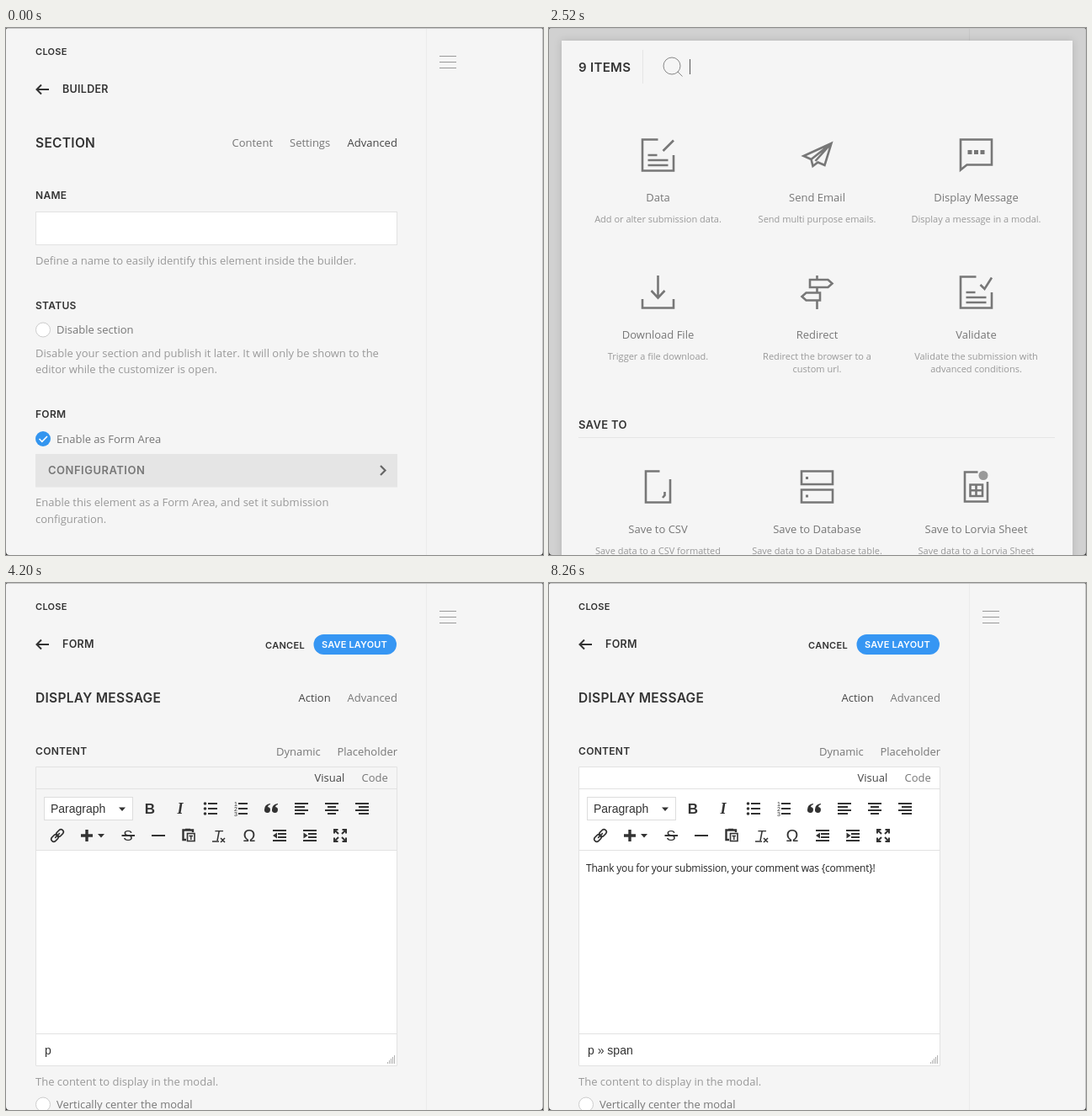
An HTML page for the animation above (8540 ms loop, 638 by 626 pixels).

```html
<!DOCTYPE html>
<html lang="en">
<head>
<meta charset="utf-8">
<title>Form action setup</title>
<style>
html, body { margin: 0; width: 100%; height: 100%; overflow: hidden; background: #f5f5f5; }
svg { display: block; width: 638px; height: 626px; }
text { font: 13px "Open Sans", sans-serif; fill: #777; white-space: pre; }
.cap { font-family: Inter, sans-serif; font-weight: 600; letter-spacing: .3px; fill: #333; }
.s11 { font-size: 11px; }
.s12 { font-size: 12px; }
.s125 { font-size: 12.5px; }
.s13 { font-size: 13px; }
.s15 { font-size: 15px; }
.title { font-size: 15.5px; }
.button { font-size: 13px; letter-spacing: .5px; fill: #777; }
.on { fill: #444; }
.help { fill: #999; }
.mid { text-anchor: middle; }
.card { color: #777; }
.card text { fill: currentColor; }
.card .note { font-size: 11px; fill: #999; }
.card.hover { color: #3d3d3d; }
.card.hover .note { fill: #777; }
.ui { font: 14px "Liberation Sans", Arial, sans-serif; fill: #333; }
.body { font-size: 12px; letter-spacing: -.2px; fill: #222; }
.tool { fill: none; stroke: #333; stroke-width: 2; }
.tool text { stroke: none; fill: #333; }
</style>
</head>
<body>
<svg id="stage" viewBox="0 0 638 626"></svg>
<script>
const LOOP = 8540, STEP = 70, PANEL = 499;

const text = (x, y, str, cls = '', id = '') =>
  `<text x="${x}" y="${y}" class="${cls}"${id && ` id="${id}"`}>${str}</text>`;
const rect = (x, y, w, h, fill, more = '') =>
  `<rect x="${x}" y="${y}" width="${w}" height="${h}" fill="${fill}" ${more}/>`;
const line = (d, color, width = 1, more = '') =>
  `<path d="${d}" fill="none" stroke="${color}" stroke-width="${width}" ${more}/>`;
const group = (id, body, more = '') => `<g id="${id}" ${more}>${body}</g>`;
const radio = y => `<circle cx="44" cy="${y}" r="8.5" fill="#fff" stroke="#ccc"/>`;

// Sidebar panels
const sectionPanel = group('section',
  text(35, 141.5, 'SECTION', 'cap title') +
  text(268.5, 140.5, 'Content') + text(337, 140.5, 'Settings') + text(405.5, 140.5, 'Advanced', 'on') +
  text(35, 203.3, 'NAME', 'cap s12') +
  rect(35.5, 218.5, 429, 39, '#fff', 'stroke="#e2e2e2"') +
  text(35, 280.5, 'Define a name to easily identify this element inside the builder.', 'help') +
  text(35, 333.5, 'STATUS', 'cap s12') + radio(358.5) + text(60, 363, 'Disable section') +
  text(35, 390.5, 'Disable your section and publish it later. It will only be shown to the', 'help') +
  text(35, 410, 'editor while the customizer is open.', 'help') +
  text(35, 463.3, 'FORM', 'cap s12') +
  '<circle cx="44" cy="488" r="9" fill="#3395ef"/>' + line('M39.5 488L42.8 491.3L49 485', '#fff', 1.6) +
  text(60, 492.5, 'Enable as Form Area') +
  rect(35, 506, 430, 39.5, '#e5e5e5') +
  text(50, 530.3, 'CONFIGURATION', 'cap button', 'config') +
  line('M445 520L450.5 525.5L445 531', '#666', 2.2) +
  text(35, 568, 'Enable this element as a Form Area, and set it submission', 'help') +
  text(35, 587.5, 'configuration.', 'help'));

const formTop =
  text(35, 141.5, 'FORM', 'cap title') +
  text(273, 140.5, 'Actions', 'on') + text(337, 140.5, 'Settings') + text(405.5, 140.5, 'Advanced') +
  text(35, 203.3, 'AFTER SUBMIT ACTIONS', 'cap s12');
const formHelp = y =>
  text(35, y, 'Set actions to be executed after a form has been successfully', 'help') +
  text(35, y + 19.5, 'submitted. The established order is respected when possible.', 'help');

const formPanel = group('form', formTop +
  text(35, 232.5, 'No actions yet.') +
  rect(35, 257, 147, 41, '#fff', 'rx="20.5"') +
  text(65, 282.3, 'ADD ACTION', 'cap button', 'add') + formHelp(332));

const listPanel = group('list', formTop +
  text(69, 248.5, 'Display Message', '', 'item') +
  line('M35 270.5H465', '#e2e2e2') +
  rect(35, 279, 93, 23.5, '#fff', 'rx="11.7"') +
  text(45, 295, 'ADD ACTION', 'cap s11') + formHelp(325.5));

// Editor toolbar
const bars = (x, y, spans) =>
  spans.map(([a, b], i) => `M${x + a} ${y - 6 + i * 4}H${x + b}`).join('');
const full = [-8, 8], half = [-2, 8];
const listRows = x => [-6, 0, 6].map(d => `M${x - 3} ${268 + d}H${x + 8}`).join('');
const corner = (x, y) =>
  `M${397 + x * 2} ${300 + y * 2}L${397 + x * 7} ${300 + y * 7}M${397 + x * 2.5} ${300 + y * 7}H${397 + x * 7}V${300 + y * 2.5}`;
const toolText = (x, y, str, style) => `<text x="${x}" y="${y}" class="mid" style="${style}">${str}</text>`;
const sans = 'font:bold 17px Liberation Sans,Arial,sans-serif';

const toolbar = '<g class="tool">' +
  rect(45.5, 254.5, 105, 27, '#fff', 'style="stroke:#ddd;stroke-width:1"') +
  text(53, 273, 'Paragraph', 'ui') +
  '<path d="M134 266.5h8l-4 4.5zM109 298h8l-4 4.5z" fill="#333" stroke="none"/>' +
  toolText(171, 274, 'B', sans) +
  toolText(207, 274, 'I', 'font:italic bold 18px Liberation Serif,serif') +
  `<path d="${listRows(243)}${listRows(279)}"/>` +
  [262, 268, 274].map((y, i) =>
    `<circle cx="236.500" cy="${y}" r="1.800" fill="#333" stroke="none"/>` +
    toolText(273, y + 2.5, i + 1, 'font:7px Liberation Sans,Arial,sans-serif')).join('') +
  '<path d="M314 262q-7 1-7 7a3.500 3.500 0 1 0 4-3q0-2 3-3zM323 262q-7 1-7 7a3.500 3.500 0 1 0 4-3q0-2 3-3z" fill="#333" stroke="none"/>' +
  `<path d="${bars(351, 268, [full, [-8, 4], full, [-8, 4]])}${bars(387, 268, [full, [-5, 5], full, [-5, 5]])}${bars(423, 268, [full, [-4, 8], full, [-4, 8]])}"/>` +
  '<g transform="translate(61 300) rotate(-45)" stroke-width="1.600"><rect x="-9" y="-3" width="9.500" height="6" rx="3"/><rect x="-.5" y="-3" width="9.500" height="6" rx="3"/><path d="M-4 0H4"/></g>' +
  line('M89 300H103M96 293V307', '#333', 3.4) +
  toolText(145, 306, 'S', sans.replace('bold ', '')) + '<path d="M137.500 300H153M173 300H189"/>' +
  '<path d="M214 305H210.500V293.500H222V296M213 293H219" stroke-width="2.400"/>' +
  '<rect x="215.500" y="297.500" width="8.500" height="9" stroke-width="1.600"/><path d="M217.500 300.500H222M219.800 300V305" stroke-width="1.400"/>' +
  toolText(252, 306, 'T', 'font:italic 17px Liberation Sans,Arial,sans-serif') +
  '<path d="M245 307H253M255 303L260 308M260 303L255 308" stroke-width="1.500"/>' +
  toolText(289, 307, 'Ω', 'font:20px Liberation Sans,Arial,sans-serif') +
  `<path d="${bars(325, 300, [full, half, half, full])}${bars(361, 300, [full, half, half, full])}"/>` +
  '<path d="M322 296.500v7l-5-3.500zM353.500 296.500v7l5-3.500z" fill="#333" stroke="none"/>' +
  `<path d="${corner(-1, -1)}${corner(1, -1)}${corner(-1, 1)}${corner(1, 1)}"/></g>`;

let grip = '';
for (let r = 0; r < 5; r++)
  for (let c = 0; c <= r; c++) grip += `M${461 - c * 2} ${562 + r * 2}h1`;

const messagePanel = group('message',
  text(35, 141.5, 'DISPLAY MESSAGE', 'cap title') +
  text(347.5, 140.5, 'Action', 'on') + text(405.5, 140.5, 'Advanced') +
  text(35, 204.3, 'CONTENT', 'cap s12') +
  text(321, 204.5, 'Dynamic') + text(393.5, 204.5, 'Placeholder') +
  rect(35, 218, 430, 100, '#fff', 'id="bar"') + rect(35, 318, 430, 256, '#fff') +
  line('M35.5 218.5H464.5V573.5H35.5ZM35 244.5H465M35 317.500H465M35 535.5H465', '#e2e2e2') +
  text(366.5, 236, 'Visual', 'on') + text(422.5, 236, 'Code') + toolbar +
  text(44, 342.5, 'Thank you for your submission, your comment was {comment}!', 'body', 'reply') +
  line('M44.5 330V345', '#222', 1, 'id="caret"') +
  text(46, 560, '', 'ui', 'trail') + line(grip, '#666') +
  text(35, 596.5, 'The content to display in the modal.', 'help') +
  radio(619.5) + text(60, 624, 'Vertically center the modal'));

// Modal cards, icons drawn around their centre
const sheet = 'M0 -18.5H-18.5V18.5H18.5V0M-12 0H-1M-12 6H12M-12 12H12';
const dots = (xs, y, s) => xs.map(x => rect(x, y, s, s, 'currentColor', 'stroke="none"')).join('');
const path = d => `<path d="${d}"/>`;
const icons = {
  data: path(sheet + 'M6 -5L18.500 -17.500'),
  send: path('M17 -14L-16 1L-7 5L-5 13L1 8.500L9 12ZM-7 5L17 -14L-2 7'),
  message: path('M-18.500 -18.500H18.500V11.500H-11L-18.500 17.500Z') + dots([-10, -2.5, 5], -6, 5),
  download: path('M0 -20V6M-8 -2L0 6.500L8 -2M-18.500 8V18.500H18.500V8'),
  redirect: path('M-8.500 -15H13L18 -10.500L13 -6H-8.500ZM3.500 .5H-13L-18 5L-13 9.500H3.500ZM0 -20V-15M0 -6V0M0 10V20'),
  validate: path(sheet + 'M5 -9L10 -4L18.500 -17.500'),
  csv: path('M2 -18.500H-14.500V18.500H14.500V-9M8 6V10L5.500 13'),
  database: path('M-18.500 -18.500H18.500V-3H-18.500ZM-18.500 3.500H18.500V18.500H-18.500Z') + dots([-13.5], -12, 3) + dots([-13.5], 9.500, 3),
  table: path('M2 -17.500H-13.500V17.500H13.500V-6M-7 -2.500H7.500V11H-7ZM-7 4.200H7.500M0 -2.500V11') +
    '<circle cx="8.500" cy="-13.500" r="5.500" fill="#999" stroke="none"/>'
};
const card = (col, y, icon, title, ...notes) => {
  const x = 129.5 + col * 189;
  return `<g class="card" id="${icon}"><g transform="translate(${x} ${y})" fill="none" stroke="currentColor" stroke-width="2.600">${icons[icon]}</g>` +
    text(x, y + 54.5, title, 'mid') +
    notes.map((n, i) => text(x, y + 79.5 + i * 15.5, n, 'mid note')).join('') + '</g>';
};

const modal = group('modal', rect(0, 0, 638, 626, '#000', 'opacity=".15"') + group('dialog',
  rect(15, 15, 607, 760, '#f5f5f5', 'style="filter:drop-shadow(0 0 5px rgba(0,0,0,.14))"') +
  text(35, 51.5, '9 ITEMS', 'cap s15') + line('M111.5 26V66M35 486.5H601', '#e5e5e5') +
  '<circle cx="146" cy="45" r="10" fill="none" stroke="#888"/>' + line('M153 52L158.500 57.500', '#888') +
  line('M167.5 37V55', '#555', 1, 'id="find"') +
  card(0, 151, 'data', 'Data', 'Add or alter submission data.') +
  card(1, 151, 'send', 'Send Email', 'Send multi purpose emails.') +
  card(2, 151, 'message', 'Display Message', 'Display a message in a modal.').replace('id="message"', 'id="pick"') +
  card(0, 314, 'download', 'Download File', 'Trigger a file download.') +
  card(1, 314, 'redirect', 'Redirect', 'Redirect the browser to a', 'custom url.') +
  card(2, 314, 'validate', 'Validate', 'Validate the submission with', 'advanced conditions.') +
  text(35, 475.5, 'SAVE TO', 'cap s13') +
  card(0, 545, 'csv', 'Save to CSV', 'Save data to a CSV formatted', 'file.') +
  card(1, 545, 'database', 'Save to Database', 'Save data to a Database table.') +
  card(2, 545, 'table', 'Save to Lorvia Sheet', 'Save data to a Lorvia Sheet', 'spreadsheet.')));

const stage = document.getElementById('stage');
stage.innerHTML =
  '<clipPath id="side"><rect width="499" height="626"/></clipPath>' +
  rect(0, 0, 638, 626, '#f5f5f5') +
  group('flash', rect(501, 0, 100, 626, '#fcfcfc') + rect(501, 67, 100, 164, '#f0f0f0')) +
  line('M515 33.5H535M515 40.5H535M515 47.5H535', '#999') +
  text(35, 32, 'CLOSE', 'cap s11') +
  line('M51 73H36.500M42 67.500L36.500 73L42 78.500', '#333', 2) +
  text(67, 77.3, '', 'cap s125', 'back') +
  group('save', text(308, 78, 'CANCEL', 'cap s11') +
    rect(365.500, 61, 98.500, 24, '#3696f3', 'rx="12"') +
    '<text x="375" y="76.500" class="cap s11" style="fill:#fff;letter-spacing:.15px">SAVE LAYOUT</text>') +
  `<g clip-path="url(#side)">${sectionPanel}${formPanel}${listPanel}${messagePanel}</g>` +
  line('M499.5 0V626', '#ebebeb') + modal +
  `<g clip-path="url(#side)">${group('glow', rect(36, 318, 428, 217, '#fff') + rect(36, 536, 428, 37, '#fff'), 'opacity=".75"')}</g>` +
  line('M0 .5H637.5V626', '#c6c6c6') +
  '<path d="M0 622Q0 626 4 626H0ZM638 622Q638 626 634 626H638ZM0 2Q0 0 2 0H0ZM638 2Q638 0 636 0H638Z" fill="#333"/>';

const el = {};
stage.querySelectorAll('[id]').forEach(e => el[e.id] = e);
el.item.style.fontWeight = 600;

const clamp = v => Math.max(0, Math.min(1, v));
const ease = v => v < .5 ? 2 * v * v : 1 - 2 * (1 - v) ** 2;
const within = (t, ...spans) => spans.some(([a, b]) => t >= a && t < b);
const show = (e, on) => e.setAttribute('display', on ? 'inline' : 'none');
const move = (e, x, y = 0) => e.setAttribute('transform', `translate(${x} ${y})`);
const hover = (e, t, at) => e.style.fill = t < at ? '#777' : t < at + STEP ? '#555' : '#3d3d3d';
const slide = (t, start) => PANEL * ease(clamp((t - start) / 247));

function render(t) {
  const done = t >= 3920;

  el.back.textContent = t < 840 ? 'BUILDER' : done ? 'FORM' : 'SECTION';
  show(el.save, done);
  hover(el.config, t, 210);
  hover(el.add, t, 1960);

  const first = t < 840 ? 0 : slide(t, 800), second = slide(t, 3920);
  move(el.section, -first);
  move(el.form, PANEL - first);
  move(el.list, -second);
  move(el.message, PANEL - second);
  move(el.glow, PANEL - second);
  show(el.section, t < 1050);
  show(el.form, !done);
  show(el.list, done);
  show(el.message, done);

  // Modal drops in, then lifts away
  const hidden = done ? clamp((t - 3890) / 300) : t < 2310 ? 1 : 1 - clamp((t - 2210) / 300);
  const veil = done ? 1 - hidden * 2 : (1 - hidden) * 2;
  el.modal.setAttribute('opacity', clamp(veil));
  el.dialog.setAttribute('opacity', 1 - hidden);
  move(el.dialog, 0, -100 * hidden);
  show(el.modal, hidden < 1);
  show(el.find, !within(t, [2730, 3290], [3780, 3920]));
  el.pick.setAttribute('class', within(t, [3500, 3920]) ? 'card hover' : 'card');
  const swap = within(t, [3990, 4060]);
  show(el.flash, swap);
  show(el.glow, swap);

  // Editor
  const filled = t >= 6580;
  show(el.bar, t >= 4270);
  show(el.reply, filled);
  show(el.caret, within(t, [5390, 5880], [6440, 7210], [7700, 8260]));
  move(el.caret, filled ? 343.5 : 0);
  el.trail.textContent = t >= 6650 ? 'p » span' : 'p';
}

const begin = performance.now();
function tick() {
  const t = (performance.now() - begin) % LOOP;
  render(Math.floor(t / STEP) * STEP);
  requestAnimationFrame(tick);
}
tick();
</script>
</body>
</html>
```
